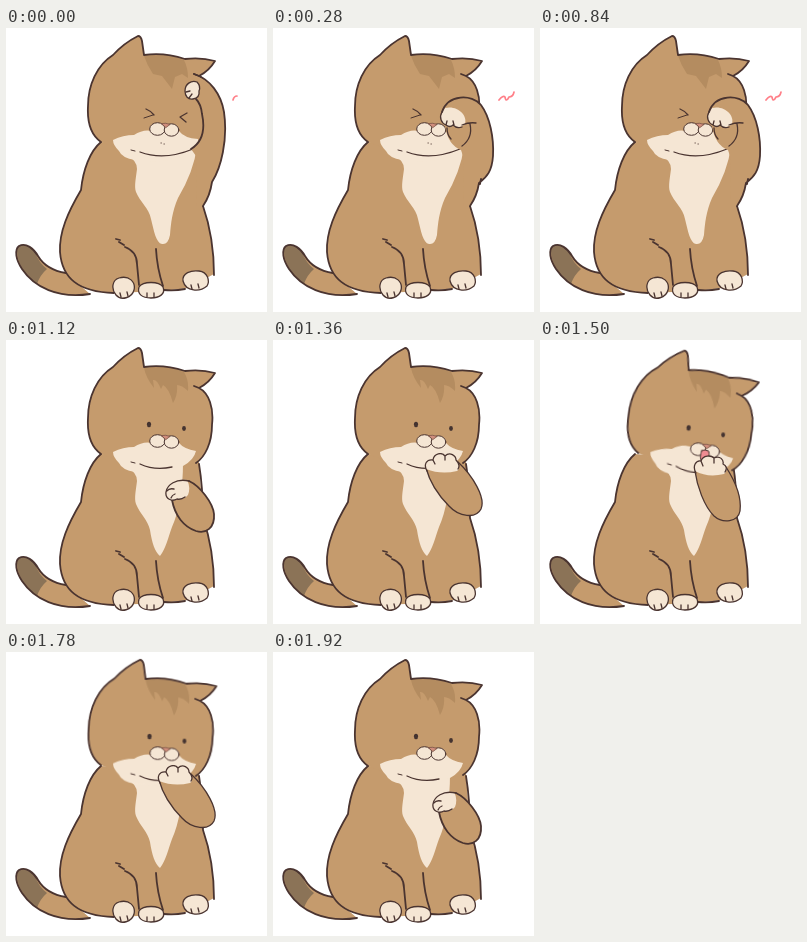
An HTML page for the animation above (2.06 s loop, 261 by 284 pixels).

```html
<!DOCTYPE html>
<html lang="en">
<head>
<meta charset="utf-8">
<title>Cat washing its face</title>
<style>
html, body { margin: 0; width: 100%; height: 100%; overflow: hidden; background: #fff; }
svg { display: block; width: 100%; height: 100%; }
path, ellipse { stroke-linecap: round; stroke-linejoin: round; }
.fur { fill: #c59b6d; }
.cream { fill: #f5e6d4; }
.stripe { fill: #b48c60; }
.line { fill: none; stroke: #4a3430; stroke-width: 1.8; }
.edge { stroke: #4a3430; stroke-width: 1.8; }
.thin { stroke-width: 1.3; }
.fine { stroke-width: 1; }
.mark { fill: none; stroke: #ff7f88; stroke-width: 1.7; }

/* Every pose holds, then switches at once. */
.high, .down, .eye, .cheek, .wipe, .calm, .squint, .rest, .mouth, .lick, .head, .muzzle {
  animation: 2060ms step-end infinite;
}
.high { animation-name: high; }
.down { animation-name: down; }
.eye { animation-name: eye; }
.cheek { animation-name: cheek; }
.wipe { animation-name: wipe; }
.calm { animation-name: calm; }
.squint { animation-name: squint; }
.rest { animation-name: rest; }
.mouth { animation-name: mouth; }
.lick { animation-name: lick; }
.head { animation-name: head; transform-origin: 140px 115px; }
.muzzle { animation-name: muzzle; }

@keyframes high { 0%, 27.184% { opacity: 1 } 6.796%, 33.981%, 100% { opacity: 0 } }
@keyframes down { 0%, 13.592%, 40.777%, 100% { opacity: 0 } 6.796%, 33.981% { opacity: 1 } }
@keyframes eye { 0%, 20.388%, 47.573%, 100% { opacity: 0 } 13.592%, 40.777% { opacity: 1 } }
@keyframes cheek { 0%, 27.184%, 54.369%, 100% { opacity: 0 } 20.388%, 47.573% { opacity: 1 } }
@keyframes wipe { 0% { opacity: 1 } 54.369%, 100% { opacity: 0 } }
@keyframes calm { 0% { opacity: 0 } 54.369%, 100% { opacity: 1 } }
@keyframes squint { 0%, 20.388%, 47.573% { opacity: 1 } 6.796%, 33.981%, 54.369%, 100% { opacity: 0 } }
@keyframes rest { 0%, 66.019% { opacity: 0 } 54.369%, 93.204%, 100% { opacity: 1 } }
@keyframes mouth { 0%, 72.816%, 93.204%, 100% { opacity: 0 } 66.019%, 86.408% { opacity: 1 } }
@keyframes lick { 0%, 86.408%, 100% { opacity: 0 } 72.816% { opacity: 1 } }
@keyframes head {
  0%, 93.204%, 100% { transform: none }
  72.816% { transform: translate(3px, 3px) rotate(5deg) }
  79.612% { transform: translate(2px, 2px) rotate(3deg) }
  86.408% { transform: rotate(1deg) }
}
@keyframes muzzle {
  0%, 86.408%, 100% { transform: none }
  72.816% { transform: translate(3px, 4px) }
  79.612% { transform: translate(3px, 3px) }
}
</style>
</head>
<body>
<svg viewBox="0 0 261 284" preserveAspectRatio="none" role="img" aria-label="A cat washing its face">
  <!-- tail -->
  <path class="fur" d="M84 266C52 271 28 259 16 241C10 232 8 222 13 218C20 214 28 221 32 228C38 238 47 243 60 245Z"/>
  <path d="M31 256C22 250 12 238 11 225C10 216 21 213 29 224Q33 235 41 241Q34 247 31 256Z" fill="#8b7357"/>
  <path class="line" d="M60 245C47 243 38 238 32 228C28 221 20 214 13 218C8 222 10 232 16 241C28 259 52 271 84 266"/>

  <!-- body -->
  <path class="fur" d="M95 114C84 123 77 142 75 162C62 184 53 204 54 224C56 250 72 264 108 265L132 264L157 263L182 260L208 246C208 222 204 198 197 178L193 122Z"/>
  <path class="line" d="M95 114C84 123 77 142 75 162C62 184 53 204 54 224C56 250 72 264 108 265M158 262Q169 263 179 261M208 247C208 222 204 198 197 178Q197 148 193 124"/>
  <path class="cream wipe" d="M120 127Q131 132 131 141C130 150 128 158 130 164C134 174 143 180 145 191C148 203 150 215 156 216Q162 217 164 207C165 195 166 184 172 170Q188 143 191 118Z"/>
  <path class="cream calm" d="M120 127Q131 132 131 141C130 150 128 158 130 164C134 174 142 180 144 190C146 203 149 212 154 216C160 208 162 198 166 187Q177 162 177 122Z"/>

  <!-- legs and feet -->
  <path class="line" d="M110 211L114 212M113 214L118 217M119 219C127 222 131 228 131 236L133 257M150 221Q151 240 157 258"/>
  <path class="cream edge thin" d="M110 267C105 261 106 252 113 250C123 247 130 254 128 262C126 270 115 273 110 267Z"/>
  <path class="cream edge thin" d="M133 259C137 253 153 253 157 259C160 266 153 270 145 270C136 270 131 266 133 259Z"/>
  <path class="cream edge thin" d="M177 253C176 245 185 242 193 243C202 244 204 253 201 258C194 264 180 264 177 253Z"/>
  <path class="line thin" d="M115 269L114 265M122 268L121 264M141 269V265M148 269V265M186 261L185 257M193 260L192 256"/>

  <!-- head -->
  <g class="head">
    <path class="fur" d="M95 114C85 107 81 95 82 78C82 57 91 37 107 27Q118 15 132 8Q135 8 136 13L138 27Q158 24 179 31Q195 29 209 33Q203 43 193 48C203 53 208 68 206 85C206 103 199 117 190 123Q145 135 95 114Z"/>
    <path class="stripe wipe" d="M138 28Q158 24 178 32Q182 40 182 50L176 46L169 49L166 61L156 48L147 46Q141 37 138 28Z"/>
    <path class="stripe calm" d="M138 28Q158 24 178 32Q183 40 182 51Q176 45 171 45Q172 55 167 63Q163 48 157 45L155 49Q151 39 147 40L148 48Q140 38 138 28Z"/>
    <path class="cream wipe" d="M107 112Q117 107 128 107Q137 101 146 103H173Q178 110 192 111Q193 120 188 125Q160 137 129 132Q116 130 113 123Q107 117 107 112Z"/>
    <path class="cream calm" d="M107 112Q117 107 128 107Q137 101 146 103H173Q178 109 190 111Q188 120 177 126Q160 134 129 132Q116 130 113 123Q107 117 107 112Z"/>
    <path class="line" d="M95 114C85 107 81 95 82 78C82 57 91 37 107 27Q118 15 132 8Q135 8 136 13L138 27Q158 24 179 31Q195 29 209 33Q203 43 193 48L188 46M193 48C203 53 208 68 206 85C206 103 199 117 190 123"/>
    <path class="line fine" d="M125 122L129 123"/>
    <path class="line thin wipe" d="M140 81Q145 83 148 87"/>
    <path class="line fine wipe" d="M147 87L138 90"/>
    <path class="line thin squint" d="M181 85L174 89L180 94"/>
    <g class="calm" fill="#443330">
      <ellipse cx="143" cy="84.5" rx="2.1" ry="2.7"/>
      <ellipse cx="178" cy="88.5" rx="1.9" ry="2.4"/>
    </g>
    <path class="line thin wipe" d="M134 124Q158 133 187 121"/>
    <path class="line thin calm" d="M134 124Q149 131 166 127"/>
    <g class="muzzle">
      <ellipse class="cream edge fine" cx="151.5" cy="101" rx="7.8" ry="6.3"/>
      <ellipse class="cream edge fine" cx="165.5" cy="102" rx="7.3" ry="6.2"/>
      <path d="M155.5 95.5Q160 94.5 164 96.5L160 99.5Z" fill="#cf8d7c" stroke="#7a5446" stroke-width=".8"/>
      <path class="lick" d="M155 102C153 110 155 114 159 114C163 113 164 108 162 102Q158 100 155 102Z" fill="#ef8c92" stroke="#4a3430" stroke-width="1"/>
    </g>
    <path class="line fine wipe" d="M155 115h.3M158 116h.3"/>
  </g>

  <!-- raised arm -->
  <g class="high">
    <path class="fur" d="M188 48C204 50 215 66 218 84C222 112 215 140 206 154Q204 168 197 178H191L190 128L185 121C198 112 199 99 196 86L190 70L181 60Z"/>
    <path class="line" d="M188 46C204 51 215 66 218 84C222 112 215 140 206 154Q204 168 197 178M185 121C198 113 199 100 196 86Q195 76 190 71"/>
    <path class="cream edge thin" d="M191 54C185 52 179 56 179 63C179 68 182 72 187 71Q194 70 193 63Q195 58 191 54Z"/>
    <path class="line thin" d="M180 64L184 63M183 70L186 66"/>
    <path class="mark" d="M227 72Q228 68 231 68"/>
  </g>
  <g class="down">
    <path class="fur" d="M176 69C184 58 202 61 209 74C219 92 224 139 206 155Q204 168 197 178H191L190 128L185 121Q198 110 196 92L174 84Z"/>
    <path class="line" d="M173 82C171 73 178 66 184 65C194 62 204 65 209 74C219 92 224 139 206 155Q204 168 197 178M185 121Q198 110 196 91"/>
    <path class="cream" d="M177 69C171 74 171 83 176 87C183 92 192 90 194 82C196 73 186 65 177 69Z"/>
    <path class="line thin" d="M173 82Q173 86 177 88Q185 92 192 87M180 88L181 83"/>
    <path class="mark" d="M227 72Q228 67 231 69Q234 71 237 66"/>
  </g>
  <g class="eye">
    <path class="fur" d="M169 84C175 66 199 66 208 77C217 89 221 110 220 128C219 143 214 149 206 155Q204 168 197 178H191L190 128L188 122Q175 117 172 98Z"/>
    <path class="cream" d="M172 80C166 86 167 94 173 97Q177 100 180 97Q186 102 192 96C195 87 184 77 172 80Z"/>
    <path class="line" d="M169 84C175 66 199 66 208 77C217 89 221 110 220 128C219 143 214 149 206 155Q204 168 197 178M208 151L207 156"/>
    <path class="line thin" d="M169 84C166 89 168 95 173 97Q177 100 180 97Q184 101 189 99M173 97L174 93M181 97L180 93M189 97Q196 94 203 95M174 100Q174 107 178 111M197 96Q200 110 189 118"/>
    <path class="mark" d="M226 72Q230 67 232 69Q233 75 236 69Q240 69 241 64"/>
  </g>
  <g class="cheek">
    <path class="fur" d="M169 104C177 88 197 86 207 97C217 109 222 128 219 139Q216 149 206 156Q204 168 197 178H191L188 133L172 122Z"/>
    <path class="cream" d="M172 101C165 107 164 116 170 120Q175 123 179 120Q187 123 191 117C193 107 182 97 172 101Z"/>
    <path class="line" d="M169 104C177 88 197 86 207 97C217 109 222 128 219 139Q216 149 206 156Q204 168 197 178M177 123Q183 133 193 134"/>
    <path class="line thin" d="M169 104C165 109 165 117 170 120Q175 123 179 120Q184 123 189 119M170 120L171 115M179 120L178 116"/>
    <path class="mark" d="M240 65Q243 60 246 62Q249 65 254 58"/>
  </g>

  <!-- lowered arm -->
  <g class="rest">
    <path class="fur" d="M183 141C194 146 207 163 208 174C209 188 200 194 190 191C178 187 169 176 166 160Z"/>
    <path class="line" d="M183 141C194 146 207 163 208 174C209 188 200 194 190 191C178 187 169 176 166 160"/>
    <path class="cream" d="M181 140C170 138 161 145 160 152C159 159 166 162 171 159Q178 160 182 155Q185 147 181 140Z"/>
    <path class="line thin" d="M183 141C170 138 161 145 160 152C159 159 166 162 171 159Q175 160 179 157M161 151Q163 148 168 149M165 158Q166 155 169 154"/>
  </g>
  <g class="mouth">
    <path class="fur" d="M153 128C157 143 166 156 176 166C186 177 203 179 208 169C213 158 200 136 185 122Z"/>
    <path class="line thin" d="M153 128C157 143 166 156 176 166C186 177 203 179 208 169C213 158 200 136 185 122"/>
    <path class="cream" d="M153 129C151 123 155 119 160 120C161 113 169 112 172 116C177 111 183 116 183 120C187 124 187 129 184 131Q168 135 153 129Z"/>
    <path class="line thin" d="M154 131C150 124 154 119 160 120C161 113 169 112 172 116C177 111 183 116 183 120C186 123 187 126 185 129M160 120L162 124M172 116V120"/>
  </g>
  <g class="lick">
    <path class="fur" d="M155 131C157 146 164 166 174 176C183 184 198 182 200 171C202 156 195 141 186 127Z"/>
    <path class="line thin" d="M155 131C157 146 164 166 174 176C183 184 198 182 200 171C202 156 195 141 186 127"/>
    <path class="cream" d="M155 131C153 125 156 120 161 121C163 115 171 115 174 118C180 115 184 120 183 124C188 127 187 132 184 134Q168 138 155 131Z"/>
    <path class="line thin" d="M156 133C152 126 156 120 161 121C163 115 171 115 174 118C180 115 184 120 183 124C187 126 187 129 185 132M161 121L163 126M174 118V123"/>
  </g>
</svg>
</body>
</html>
```
